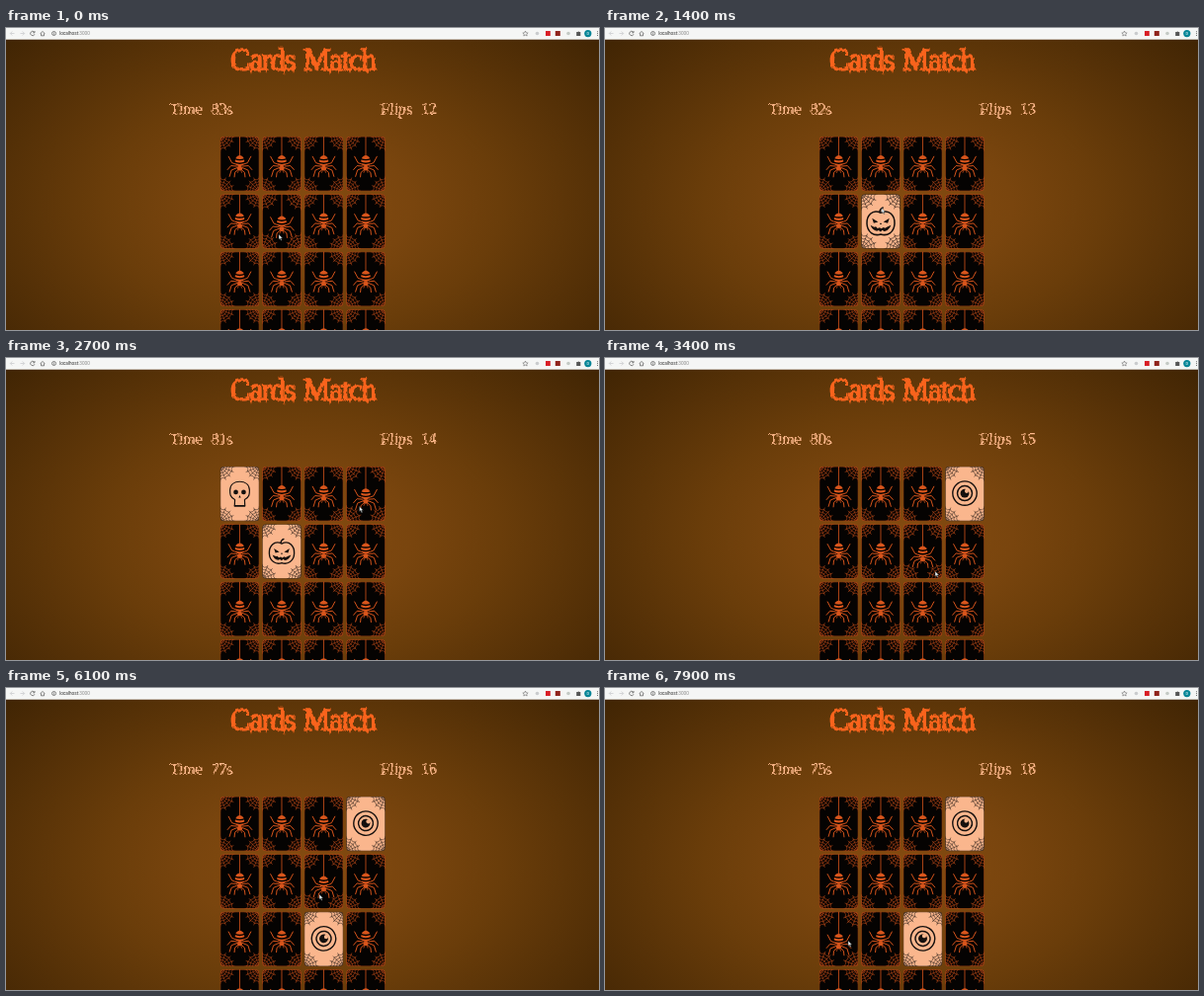
Recreate the animation shown at these times as an HTML page. Size 600 by 306 pixels, loop 8 s.

```html
<!DOCTYPE html>
<html lang="en">
<head>
<meta charset="utf-8">
<title>Cards Match</title>
<style>
  html, body { margin: 0; width: 100%; height: 100%; overflow: hidden; background: #3e2304; }
  svg { display: block; width: 100vw; height: 100vh; }
  .title { font: 31px "Liberation Serif", "Noto Serif", serif; letter-spacing: -1.3px; word-spacing: 2px; fill: #f9641e; stroke: #f9641e; stroke-width: 1.3; }
  .stat { font: 15.9px "Liberation Serif", "Noto Serif", serif; word-spacing: 5px; fill: #ffb98c; stroke: #ffb98c; stroke-width: .2; }
  .url { font: 4.7px Roboto, "Liberation Sans", sans-serif; fill: #333; }
  .line { fill: none; stroke: currentColor; stroke-linecap: round; stroke-linejoin: round; }
  .back { color: #d8551c; }
  .front { color: #15100e; }
  .web { opacity: .8; transform: scale(calc(1 + .11 * var(--hover))); }
  .back .icon { transform: translateY(calc(3.2px * var(--hover))); }
  .front .icon { transform-origin: 20px 27.5px; transform: scale(calc(1 + .11 * var(--hover))) rotate(var(--dance)); }
</style>
</head>
<body>
<svg viewBox="0 0 600 306" preserveAspectRatio="none">
  <defs>
    <radialGradient id="glow" gradientUnits="userSpaceOnUse" cx="0" cy="0" r="1" gradientTransform="translate(300 180) scale(400 250)">
      <stop offset="0" stop-color="#844b10"/>
      <stop offset=".28" stop-color="#79450e"/>
      <stop offset=".5" stop-color="#6a3d0a"/>
      <stop offset="1" stop-color="#412504"/>
    </radialGradient>
    <filter id="ragged" x="-5%" y="-20%" width="110%" height="140%">
      <feTurbulence type="turbulence" baseFrequency=".22 .12" numOctaves="2" seed="4"/>
      <feDisplacementMap in="SourceGraphic" scale="2.4" xChannelSelector="R" yChannelSelector="G"/>
    </filter>
    <clipPath id="cardShape"><rect width="40" height="56" rx="3.8"/></clipPath>
    <path id="web" class="line" stroke-width=".6"/>
    <g id="spider">
      <path class="line" stroke-width=".8" d="M20 -4V20"/>
      <g id="legs" class="line" stroke-width="1">
        <path d="M17.5 29L12 27 8.5 20.5M17 30.5L11 30 7.5 34M17.5 32L11.5 34.5 9.5 41M18.3 34L15 37 14.5 41.5"/>
      </g>
      <use href="#legs" transform="translate(40 0) scale(-1 1)"/>
      <ellipse cx="20" cy="25" rx="4.8" ry="5.7" fill="currentColor"/>
      <path d="M15 23Q20 25 25 23M15 26.6Q20 28.6 25 26.6" fill="none" stroke="#000" stroke-width="1.4"/>
      <ellipse cx="20" cy="32.7" rx="2.6" ry="2.4" fill="currentColor"/>
      <path class="line" stroke-width=".7" d="M18.7 34.7L18 37M21.3 34.7L22 37"/>
    </g>
    <g id="pumpkin">
      <path class="line" stroke-width="1.4" d="M20 20C12 16 6.8 23 7.2 30C7.5 38 14 42 20 39.8C26 42 32.5 38 32.8 30C33.2 23 28 16 20 20ZM19 19.5Q19 16.5 22 15.2"/>
      <path fill="currentColor" d="M12 25L17.6 28.5 13.5 29.5ZM28 25L22.4 28.5 26.5 29.5ZM19 30.8L20 29 21 30.8ZM10.5 31.5L14 33.2 15.5 32.8 17 34.4 19 33.6 20.5 34.7 22.5 33.4 24 34.2 26 33 29.5 31.5C28 35.5 25 37.3 23 37.2L21.5 36 20 37.5 18 36.2 16.5 37C13.5 36.5 11.5 34.5 10.5 31.5Z"/>
    </g>
    <g id="skull">
      <path class="line" stroke-width="1.2" d="M15 34C9.5 31.5 10 27.5 10 24C10.2 18.3 14.5 15.5 20 15.5C25.5 15.5 29.8 18.3 30 24C30 27.5 30.5 31.5 25 34L25.3 40.5H14.7Z"/>
      <circle cx="16" cy="26.3" r="2.4" fill="currentColor"/>
      <circle cx="24" cy="26.3" r="2.4" fill="currentColor"/>
      <path fill="currentColor" d="M20 29.5L21.2 32H18.8ZM14.3 39.6H25.7V41.2H14.3Z"/>
    </g>
    <g id="eye">
      <circle class="line" cx="20" cy="27.5" r="12.4" stroke-width="1.4"/>
      <circle class="line" cx="20" cy="27.5" r="7.6" stroke-width="1.5"/>
      <circle cx="20" cy="27.5" r="4.5" fill="currentColor"/>
      <circle cx="22" cy="25.2" r="2.1" fill="#fab68d"/>
    </g>
  </defs>

  <rect width="600" height="306" fill="url(#glow)"/>

  <g id="toolbar">
    <rect width="600" height="11.7" fill="#f5f6f5"/>
    <g fill="none" stroke="#555" stroke-width=".7">
      <path d="M8.5 5.5H4.5M6.3 3.5L4.3 5.5 6.3 7.5M14.5 5.5H18.5M16.7 3.5L18.7 5.5 16.7 7.5" stroke="#c4c6c9"/>
      <path d="M28.6 4.1A2.2 2.2 0 1 0 29 6.2M29 3V4.8H27.2M34.8 5.6L37 3.4 39.2 5.6M35.5 5.3V7.8H38.5V5.3"/>
      <circle cx="48.5" cy="5.5" r="2"/>
      <path d="M48.5 5.2V6.6M48.5 4.2V4.6"/>
      <path stroke-width=".5" d="M525.5 3L526.3 4.8 528.2 5 526.8 6.2 527.2 8 525.5 7.1 523.8 8 524.2 6.2 522.8 5 524.7 4.8Z"/>
    </g>
    <text class="url" x="54" y="7.2">localhost<tspan fill="#888">:3000</tspan></text>
    <circle cx="537.5" cy="5.5" r="1.8" fill="#c9cbcd"/>
    <rect x="546" y="3" width="4.8" height="5" fill="#d91f26"/>
    <rect x="555.8" y="3" width="5" height="5" fill="#8f241c"/>
    <circle cx="569" cy="5.5" r="1.8" fill="#c4cac5"/>
    <path d="M577.2 4H578.5A.9.9 0 0 1 580.2 4H581.3V8H577.2Z" fill="#555"/>
    <circle cx="588.8" cy="5.6" r="3.6" fill="#078596"/>
    <text x="588.8" y="7" text-anchor="middle" font-family="Roboto, sans-serif" font-size="4" fill="#fff">D</text>
    <path d="M598.5 3.3V8" stroke="#555" stroke-width=".9" stroke-dasharray=".9 1"/>
  </g>

  <g filter="url(#ragged)">
    <text class="title" x="299.5" y="42" text-anchor="middle">Cards Match</text>
    <path id="drips" fill="#f9641e"/>
  </g>
  <g filter="url(#ragged)">
    <text id="time" class="stat" x="197" y="87" text-anchor="middle"></text>
    <text id="flips" class="stat" x="407" y="87" text-anchor="middle"></text>
  </g>
  <g id="board"></g>
  <path id="cursor" d="M0 0V5.2L1.2 4.2 2.2 6.3 3.1 5.9 2.2 3.9H3.8Z" fill="#e6f1f2" stroke="#222" stroke-width=".45"/>
</svg>

<script>
const LOOP = 8000, FLIP_MS = 500, HOVER_MS = 100, DANCE_START = 4500;
const CARD_W = 40, CARD_H = 56, CARD_SCALE = .985;
const $ = id => document.getElementById(id);
const clamp = v => Math.min(1, Math.max(0, v));
const smooth = v => (v = clamp(v)) * v * (3 - 2 * v);

// One entry per click; cards without a close time are a matched pair.
const turns = [
  { row: 1, col: 1, icon: "pumpkin", open: 100, close: 2760 },
  { row: 0, col: 0, icon: "skull", open: 1760, close: 2760 },
  { row: 0, col: 3, icon: "eye", open: 2900 },
  { row: 2, col: 2, icon: "eye", open: 4000 },
  { row: 1, col: 2, icon: "skull", open: 6250, close: 7350 },
  { row: 2, col: 0, icon: "pumpkin", open: 6800, close: 7350 }
];

// time, x, y
const cursorPath = [
  [0, 276, 209], [150, 277, 209], [700, 308, 230], [1200, 300, 200], [1700, 243, 150],
  [1780, 244, 150], [2100, 298, 156], [2800, 361, 150], [2950, 361, 152], [3400, 334, 216],
  [3900, 324, 252], [4050, 325, 252], [4700, 382, 237], [5500, 350, 222], [6100, 317, 209],
  [6300, 317, 209], [6750, 240, 254], [6900, 241, 254], [7900, 246, 256], [8000, 246, 256]
];

function webPath() {
  const spokes = [0, 22.5, 45, 67.5, 90];
  const at = (deg, r) => {
    const a = deg * Math.PI / 180;
    return `${(r * Math.cos(a)).toFixed(2)} ${(r * Math.sin(a)).toFixed(2)}`;
  };
  let d = spokes.map(a => `M0 0L${at(a, 14.5)}`).join("");
  for (const r of [4, 7, 10, 13]) {
    d += `M${at(0, r)}`;
    for (const a of spokes.slice(1)) d += `Q${at(a - 11.25, r * .82)} ${at(a, r)}`;
  }
  return d;
}

function dripPath() {
  const xs = [237, 248, 256, 263, 274, 281, 290, 304, 314, 327, 336, 348, 357, 365];
  return xs.map((x, i) => `M${x - 1.8} 40L${x} ${44 + i * 7 % 4}L${x + 1.8} 40Z`).join("");
}

function faceMarkup(kind, fill, icon) {
  const corners = [[0, 0], [1, 0], [0, 1], [1, 1]].map(([right, bottom]) =>
    `<g transform="translate(${right * CARD_W} ${bottom * CARD_H}) scale(${1 - 2 * right} ${1 - 2 * bottom})">
      <use class="web" href="#web"/></g>`).join("");
  return `<g class="${kind}" clip-path="url(#cardShape)">
    <rect width="${CARD_W}" height="${CARD_H}" rx="3.8" fill="${fill}" stroke="currentColor" stroke-width=".6"/>
    ${corners}<use class="icon" href="#${icon}"/></g>`;
}

function buildCards() {
  const cards = [];
  for (let row = 0; row < 4; row++) for (let col = 0; col < 4; col++) {
    const turn = turns.find(t => t.row === row && t.col === col);
    const node = document.createElementNS("http://www.w3.org/2000/svg", "g");
    node.innerHTML = faceMarkup("back", "#050302", "spider") + (turn ? faceMarkup("front", "#fab68d", turn.icon) : "");
    $("board").append(node);
    cards.push({ node, turn, x: 216.8 + col * 42.5, y: 110 + row * 58.4 });
  }
  return cards;
}

function openness({ open, close = Infinity }, t) {
  return smooth((t - open) / FLIP_MS) - smooth((t - close) / FLIP_MS);
}

function cursorAt(t) {
  const i = cursorPath.findIndex(p => p[0] > t);
  const [a, b] = [cursorPath[i - 1], cursorPath[i]];
  const k = smooth((t - a[0]) / (b[0] - a[0]));
  return [a[1] + (b[1] - a[1]) * k, a[2] + (b[2] - a[2]) * k];
}

// Share of the last HOVER_MS that the pointer spent over the card.
function hoverLevel(card, t) {
  const samples = [0, .25, .5, .75, 1].map(k => cursorAt(Math.max(0, t - k * HOVER_MS)));
  const inside = samples.filter(([x, y]) =>
    x >= card.x && x <= card.x + CARD_W * CARD_SCALE && y >= card.y && y <= card.y + CARD_H * CARD_SCALE);
  return inside.length / samples.length;
}

// Matched icons swing 30 degrees each way, once a second.
function danceAngle(turn, t) {
  if (!turn || turn.close || t < DANCE_START) return 0;
  return -60 / Math.PI * Math.asin(Math.sin((t - DANCE_START) / 1000 * 2 * Math.PI));
}

$("web").setAttribute("d", webPath());
$("drips").setAttribute("d", dripPath());
const cards = buildCards();

function renderCard(card, t) {
  const { node, turn, x, y } = card;
  const k = turn ? openness(turn, t) : 0;
  const width = Math.abs(Math.cos(k * Math.PI));
  const half = CARD_W / 2;
  node.setAttribute("transform",
    `translate(${x + half * CARD_SCALE} ${y}) scale(${width * CARD_SCALE} ${CARD_SCALE}) translate(${-half} 0)`);
  node.style.setProperty("--hover", hoverLevel(card, t));
  node.style.setProperty("--dance", `${danceAngle(turn, t)}deg`);
  if (turn) {
    node.children[0].style.display = k < .5 ? "" : "none";
    node.children[1].style.display = k < .5 ? "none" : "";
  }
}

function render(t) {
  $("time").textContent = `Time ${83 - Math.floor((t + 200) / 1000)}s`;
  $("flips").textContent = `Flips ${12 + turns.filter(turn => t >= turn.open).length}`;
  for (const card of cards) renderCard(card, t);
  $("cursor").setAttribute("transform", `translate(${cursorAt(t).join(" ")})`);
}

const start = performance.now();
function tick() {
  render((performance.now() - start) % LOOP);
  requestAnimationFrame(tick);
}
tick();
</script>
</body>
</html>
```
